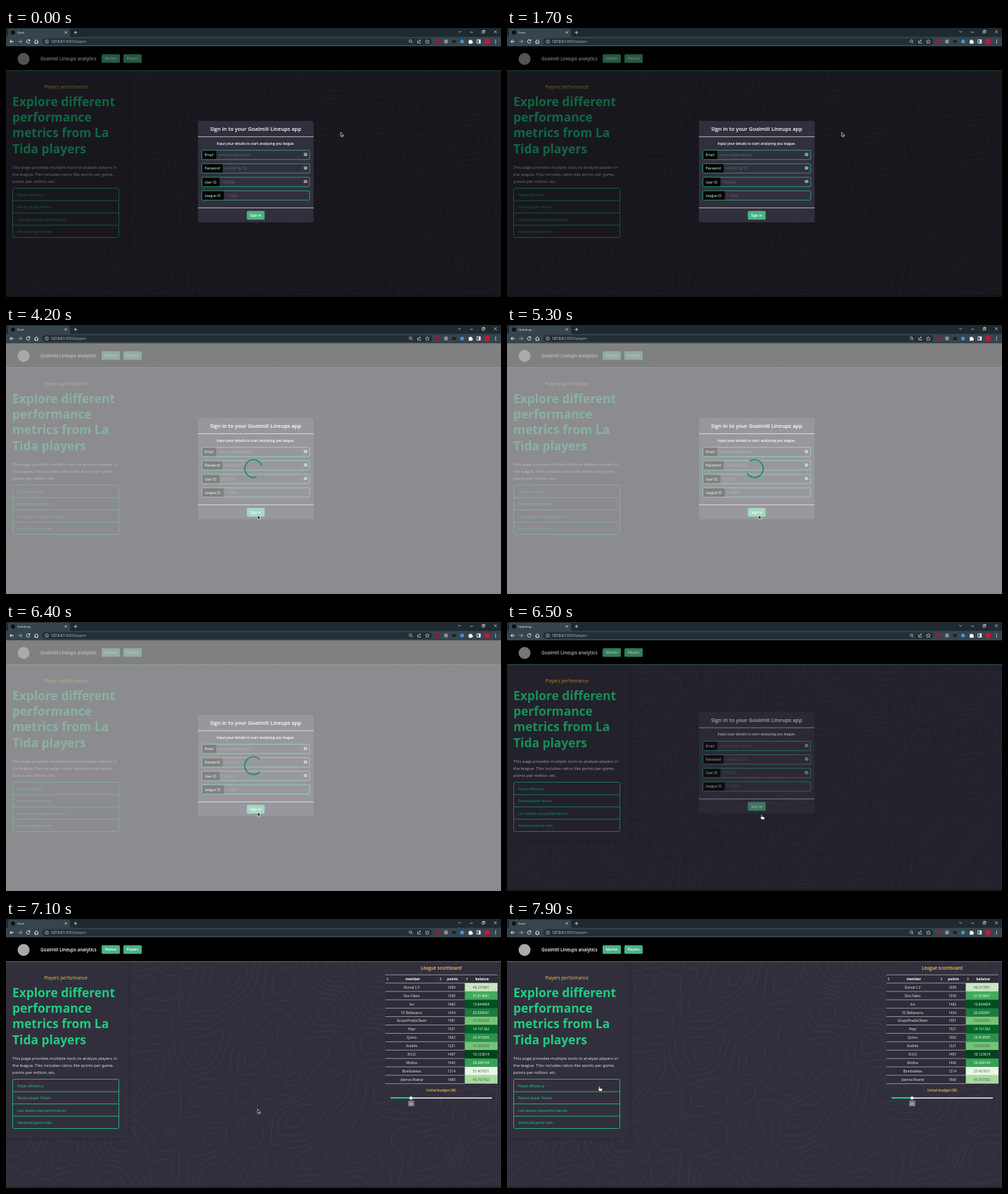
An HTML page for the animation above (8000 ms loop, 704 by 382 pixels).

```html
<!DOCTYPE html>
<html lang="en">
<head>
<meta charset="utf-8">
<title>Dash</title>
<style>
  html, body { margin: 0; width: 100%; height: 100%; overflow: hidden; background: #322f3d; }
  svg { display: block; width: 100vw; height: 100vh; }
  text { font-family: "Open Sans", "Noto Sans", sans-serif; white-space: pre; }
</style>
</head>
<body>
<svg id="stage" viewBox="0 0 704 382" xmlns="http://www.w3.org/2000/svg"></svg>
<script>
const stage = document.getElementById('stage');
const GREEN = '#1fcd80', YELLOW = '#f6c445', PAGE = '#322f3d', BUTTON = '#49b384';

function add(parent, tag, attrs, content) {
  const node = document.createElementNS('http://www.w3.org/2000/svg', tag);
  for (const key in attrs) node.setAttribute(key, attrs[key]);
  if (content !== undefined) node.textContent = content;
  parent.appendChild(node);
  return node;
}
const group = parent => add(parent, 'g', {});
const rect = (g, x, y, width, height, fill, more) =>
  add(g, 'rect', { x, y, width, height, fill, ...more });
const dot = (g, cx, cy, r, fill, more) => add(g, 'circle', { cx, cy, r, fill, ...more });
const line = (g, d, stroke, width = 0.8, more) =>
  add(g, 'path', { d, stroke, 'stroke-width': width, fill: 'none', ...more });
const text = (g, x, y, size, fill, content, weight = 400, anchor = 'start') =>
  add(g, 'text', { x, y, 'font-size': size, fill, 'font-weight': weight, 'text-anchor': anchor }, content);
const button = (g, x, y, w, h, label) => {
  rect(g, x, y, w, h, BUTTON, { rx: 1.6 });
  text(g, x + w / 2, y + h / 2 + 1.8, 4.9, '#fff', label, 600, 'middle');
};

// Contour lines of a smooth height field, by marching squares
function contours(x0, y0, x1, y1, cell, gap) {
  const height = (x, y) =>
    1.3 * Math.sin(x / 31 + 1.7 * Math.sin(y / 43)) + 1.2 * Math.cos(y / 24 + 1.4 * Math.sin(x / 52)) +
    0.8 * Math.sin((x + y) / 19 + 2) + 0.7 * Math.cos((x - 1.4 * y) / 23) + 0.25 * Math.sin(x / 7 + y / 11);
  let d = '';
  for (let y = y0; y < y1; y += cell) for (let x = x0; x < x1; x += cell) {
    const corners = [[x, y], [x + cell, y], [x + cell, y + cell], [x, y + cell]];
    const h = corners.map(c => height(...c));
    for (let level = Math.ceil(Math.min(...h) / gap) * gap; level < Math.max(...h); level += gap) {
      const cuts = [];
      for (let i = 0; i < 4; i++) {
        const j = (i + 1) % 4;
        if ((h[i] < level) === (h[j] < level)) continue;
        const k = (level - h[i]) / (h[j] - h[i]);
        cuts.push([0, 1].map(a => (corners[i][a] + k * (corners[j][a] - corners[i][a])).toFixed(1)));
      }
      for (let i = 0; i + 1 < cuts.length; i += 2) d += `M${cuts[i]}L${cuts[i + 1]}`;
    }
  }
  return d;
}

function drawPage(g) {
  rect(g, 0, 26, 704, 356, PAGE);
  line(g, contours(0, 60, 704, 380, 4, 1.05), '#474452', 0.55);
  rect(g, -6, 64, 181, 248, '#24212c', { style: 'filter:blur(2px)', opacity: 0.6 });
  rect(g, 0, 61, 174, 250, PAGE);
  rect(g, 0, 379.5, 704, 2.5, '#35202d');

  rect(g, 0, 26, 704, 34.5, '#000');
  rect(g, 0, 60, 704, 0.9, '#3f8a6d');
  dot(g, 25, 44, 8.5, '#a9a9a9');
  text(g, 49, 45.8, 6.35, '#fff', 'Goalmill Lineups analytics', 600);
  button(g, 136, 37.3, 26, 12.2, 'Market');
  button(g, 167, 37.3, 26, 12.2, 'Players');

  text(g, 85, 85.5, 6.35, YELLOW, 'Players performance', 500, 'middle');
  ['Explore different', 'performance', 'metrics from La', 'Tida players'].forEach((s, i) =>
    text(g, 9, 110.8 + i * 22.25, 17.4, GREEN, s, 700));
  ['This page provides multiple tools to analyze players in',
   'the league. This includes ratios like points per game,',
   'points per million, etc.'].forEach((s, i) =>
    text(g, 9, 199.8 + i * 9.95, 5.95, '#e6e6ea', s));

  rect(g, 9.5, 227.5, 151, 70, 'none', { rx: 2, stroke: GREEN, 'stroke-width': 0.8 });
  line(g, 'M9.5 245.2H160.5M9.5 262.6H160.5M9.5 280H160.5', GREEN, 0.8);
  ['Player efficiency', 'Recent player fitness', 'Last season top performances', 'Advanced game stats']
    .forEach((s, i) => text(g, 16, 238.5 + i * 17.5, 4.96, GREEN, s));
}

function drawTable(g) {
  const rows = [
    ['Dorval C.F', 1659, '48.237881', '#c7e9c0'],
    ['Don Fabio', 1530, '31.314641', '#42ab5d'],
    ['Ivo', 1482, '13.644404', '#00501f'],
    ['FC Bellavarra', 1434, '20.036041', '#1b7d3c'],
    ['GrupoPradosTeam', 1591, '34.066094', '#74c476'],
    ['Pepi', 1521, '14.191362', '#006428'],
    ['Quino', 1602, '25.418500', '#2a924a'],
    ['Andrés', 1221, '34.009393', '#74c476'],
    ['R.V.D', 1497, '10.123614', '#00441b'],
    ['Molina', 1442, '29.088194', '#38a055'],
    ['Bomboletas', 1214, '57.407871', '#e8f6e3'],
    ['¡Vamos Rivera!', 1660, '44.793782', '#a6dba0'],
  ];
  const step = 11.9, light = ['#c7e9c0', '#74c476', '#e8f6e3', '#a6dba0'];
  text(g, 619, 72.4, 6.35, YELLOW, 'League scoreboard', 600, 'middle');
  rect(g, 539.5, 79, 159.5, 12 + step * 12, '#2f2c39');
  [[542.6, 578.5, 'member'], [618, 635, 'points'], [655.6, 677, 'balance']].forEach(([ix, x, s]) => {
    add(g, 'path', { d: `M${ix - 1.2} 84.6l1.2-1.7 1.2 1.7zm0 .9l1.2 1.7 1.2-1.7z`, fill: '#c9c9cf' });
    text(g, x, 87, 4.9, '#fff', s, 700, 'middle');
  });
  rows.forEach(([name, points, balance, fill], i) => {
    const top = 91 + i * step, base = top + 7.8;
    rect(g, 652.5, top, 46.5, step, fill);
    text(g, 577, base, 4.85, '#f2f2f5', name, 400, 'middle');
    text(g, 633.5, base, 4.85, '#f2f2f5', points, 400, 'middle');
    text(g, 675.5, base, 4.9, light.includes(fill) ? '#4b5a50' : '#fff', balance, 400, 'middle');
  });
  for (let i = -1; i <= 12; i++) {
    const y = i < 0 ? 79.3 : 91 + i * step;
    line(g, `M539.5 ${y}H${i < 1 ? 699 : 652.5}`, '#d4d4da', 0.6);
  }
  text(g, 619, 244.8, 5.1, YELLOW, 'Initial budget (M)', 600, 'middle');
  line(g, 'M547 254.3H691', '#ececf0', 1.5);
  line(g, 'M547 254.3H576', GREEN, 1.5);
  dot(g, 576, 254.3, 2.1, '#fff', { stroke: '#bfeadb', 'stroke-width': 0.6 });
  rect(g, 572, 258, 8.6, 8, '#7d7b86', { rx: 1 });
  text(g, 576.3, 263.5, 4.1, '#e8e8ec', '20', 400, 'middle');
}

function drawModal(g) {
  rect(g, 273, 132, 164.5, 144, PAGE, { rx: 1.5 });
  text(g, 355, 146.2, 7.5, '#fff', 'Sign in to your Goalmill Lineups app', 600, 'middle');
  line(g, 'M273 154.4H437.5M273 255.4H437.5', '#d9d9de', 0.8);
  text(g, 355, 165.6, 4.84, '#fff', 'Input your details to start analyzing you league.', 600, 'middle');
  [['Email', 299, 'some.one@mail.test'], ['Password', 308, 'ui4FyW*sj27$'],
   ['User ID', 303.5, '7350285'], ['League ID', 309.7, '112626']].forEach(([label, edge, hint], i) => {
    const y = 173.6 + i * 19.2;
    rect(g, 278.6, y, edge - 278.6, 13.2, '#000');
    rect(g, 278.6, y, 153.2, 13.2, 'none', { stroke: '#27b585', 'stroke-width': 0.8, rx: 1 });
    text(g, 282.5, y + 8.5, 4.85, '#fff', label, 500);
    text(g, edge + 2.5, y + 8.5, 4.9, '#6a6775', hint);
    if (i < 3) {
      rect(g, 423.6, y + 3.9, 4.8, 4.2, '#a7a6ae', { rx: 0.6 });
      line(g, `M424.4 ${y + 6}h3.2`, '#4a4754', 0.8, { 'stroke-dasharray': '.8 .4' });
    }
  });
  button(g, 342.5, 259.8, 25.3, 12.4, 'Sign in');
}

function drawBrowser(g) {
  const bar = '#36454d', ink = '#dfe4e7';
  rect(g, 0, 0, 704, 13, '#1e2a30');
  rect(g, 0, 12.6, 704, 13.4, bar);
  add(g, 'path', { d: 'M1 13Q3 13 3 10V3Q3 1 5 1H89Q91 1 91 3V10Q91 13 93 13Z', fill: bar });
  dot(g, 10, 6.4, 3, '#111');
  line(g, 'M83.6 4.8l3 3m0-3l-3 3M96.6 6.3h4.6m-2.3-2.3v4.6', ink, 0.8);
  line(g, 'M643.3 4.4l1.8 1.8 1.8-1.8M660 6h4M677 4.3h3v3h-3zM678 4.3v-1h3v3h-1M694 3.4l4 4m0-4l-4 4', ink, 0.7);

  rect(g, 51.5, 14.4, 555, 9.6, '#232f36', { rx: 4.8 });
  line(g, 'M11 19.2H5.6m2.4-2.4l-2.4 2.4 2.4 2.4', '#fff', 0.9);
  line(g, 'M17.4 19.2h5.4m-2.4-2.4l2.4 2.4-2.4 2.4', '#aab3b8', 0.9);
  line(g, 'M33.4 17.6a2.4 2.4 0 1 0 .5 2.2M33.8 16.3v1.8h-1.8', '#fff', 0.9);
  line(g, 'M40.4 19.4l2.8-2.6 2.8 2.6M41.2 19v2.8h4V19', '#fff', 0.9);
  dot(g, 58, 19.2, 2.3, 'none', { stroke: ink, 'stroke-width': 0.6 });
  line(g, 'M58 18.9v1.5M58 17.8v.5', ink, 0.6);
  const url = text(g, 64, 21, 4.75, '#fff', '127.0.0.1');
  add(url, 'tspan', { fill: '#a9b4ba' }, ':8050/players');

  dot(g, 575.2, 18.6, 1.8, 'none', { stroke: ink, 'stroke-width': 0.7 });
  line(g, 'M576.5 20l1.6 1.6M585.5 18v3.4h4V20M586.6 19.6q.3-2 2.6-2m-1-1.2l1.3 1.2-1.3 1.2', ink, 0.7);
  line(g, 'M599.2 16.4l.9 1.9 2 .2-1.5 1.4.4 2-1.8-1-1.8 1 .4-2-1.5-1.4 2-.2z', ink, 0.6);
  rect(g, 611, 16.6, 5.2, 5.2, '#a3182f', { rx: 1 });
  rect(g, 623.2, 16.6, 5.2, 5.2, '#8b9195', { rx: 1 });
  rect(g, 634.6, 16.9, 5.2, 4.6, '#17252b', { rx: 1 });
  dot(g, 648.6, 19.2, 2.6, '#4a8fe0');
  add(g, 'path', { d: 'M658 17.6h1.6a1 1 0 0 1 2 0h1.5v1.6a1 1 0 0 1 0 2v1h-5.1z', fill: '#fff' });
  rect(g, 669.9, 16.8, 4.8, 4.8, 'none', { stroke: '#fff', 'stroke-width': 0.8 });
  rect(g, 672.4, 16.8, 2.3, 4.8, '#fff');
  dot(g, 684.2, 19.2, 4, '#c2183c');
  for (const y of [17.2, 19.2, 21.2]) dot(g, 696.3, y, 0.6, '#fff');
  return text(g, 16, 8, 4.3, '#f2f4f5', 'Dash');
}

drawPage(group(stage));
const table = group(stage);
drawTable(table);
const backdrop = rect(stage, 0, 26, 704, 356, '#000');
const modal = group(stage);
drawModal(modal);

const loader = group(stage);
rect(loader, 0, 26, 704, 356, '#fff', { opacity: 0.5 });
const spinner = dot(loader, 352, 204, 12.5, 'none',
  { stroke: '#1b8a62', 'stroke-width': 1.7, pathLength: 4, 'stroke-dasharray': '3 1' });

const tabTitle = drawBrowser(group(stage));

const cursor = group(stage);
const arrow = add(cursor, 'path', {
  d: 'M0 0V6.1L1.4 4.9 2.3 7 3.3 6.6 2.4 4.5H4.3Z',
  fill: '#111', stroke: '#fff', 'stroke-width': 0.6, 'stroke-linejoin': 'round' });
const hand = add(cursor, 'path', {
  d: 'M1.6 .8Q2.3 0 3 .8V3.2L6.2 4Q6.8 4.3 6.6 5.2L6 7.6H2.6L.2 4.9Q0 4 .9 4.2L1.6 4.7Z',
  transform: 'translate(1.8 3)', fill: '#fff', stroke: '#111', 'stroke-width': 0.5 });

// Pointer moves: start, end, from, to
const MOVES = [
  [2900, 3500, [476, 148], [358, 270]],
  [7300, 7900, [358, 270], [127.2, 234]],
];
function pointerAt(t) {
  const [start, end, from, to] = MOVES[t < 5000 ? 0 : 1];
  const k = Math.min(1, Math.max(0, (t - start) / (end - start)));
  const eased = k * k * (3 - 2 * k);
  return from.map((v, i) => v + (to[i] - v) * eased);
}

const show = (node, on) => { node.style.display = on ? '' : 'none'; };

function render(t) {
  const [x, y] = pointerAt(t);
  const overLink = (t >= 3500 && t < 4200) || t === 6500 || t >= 7900;
  const closing = t === 6500;
  cursor.setAttribute('transform', `translate(${x} ${y})`);
  show(arrow, !overLink);
  show(hand, overLink);

  show(backdrop, t < 6600);
  show(modal, t < 6600);
  backdrop.setAttribute('opacity', closing ? 0.3 : 0.5);
  modal.setAttribute('opacity', closing ? 0.6 : 1);
  modal.setAttribute('transform', `translate(0 ${closing ? -4.2 : 0})`);

  show(loader, t >= 4200 && t < 6500);
  spinner.setAttribute('transform', `rotate(${69 + (t - 4200) / 750 * 360} 352 204)`);
  show(table, t >= 6700);
  tabTitle.textContent = t >= 4300 && t < 6800 ? 'Updating...' : 'Dash';
}

function tick() {
  render(Math.floor(performance.now() % 8000 / 100) * 100);
  requestAnimationFrame(tick);
}
tick();
</script>
</body>
</html>
```
